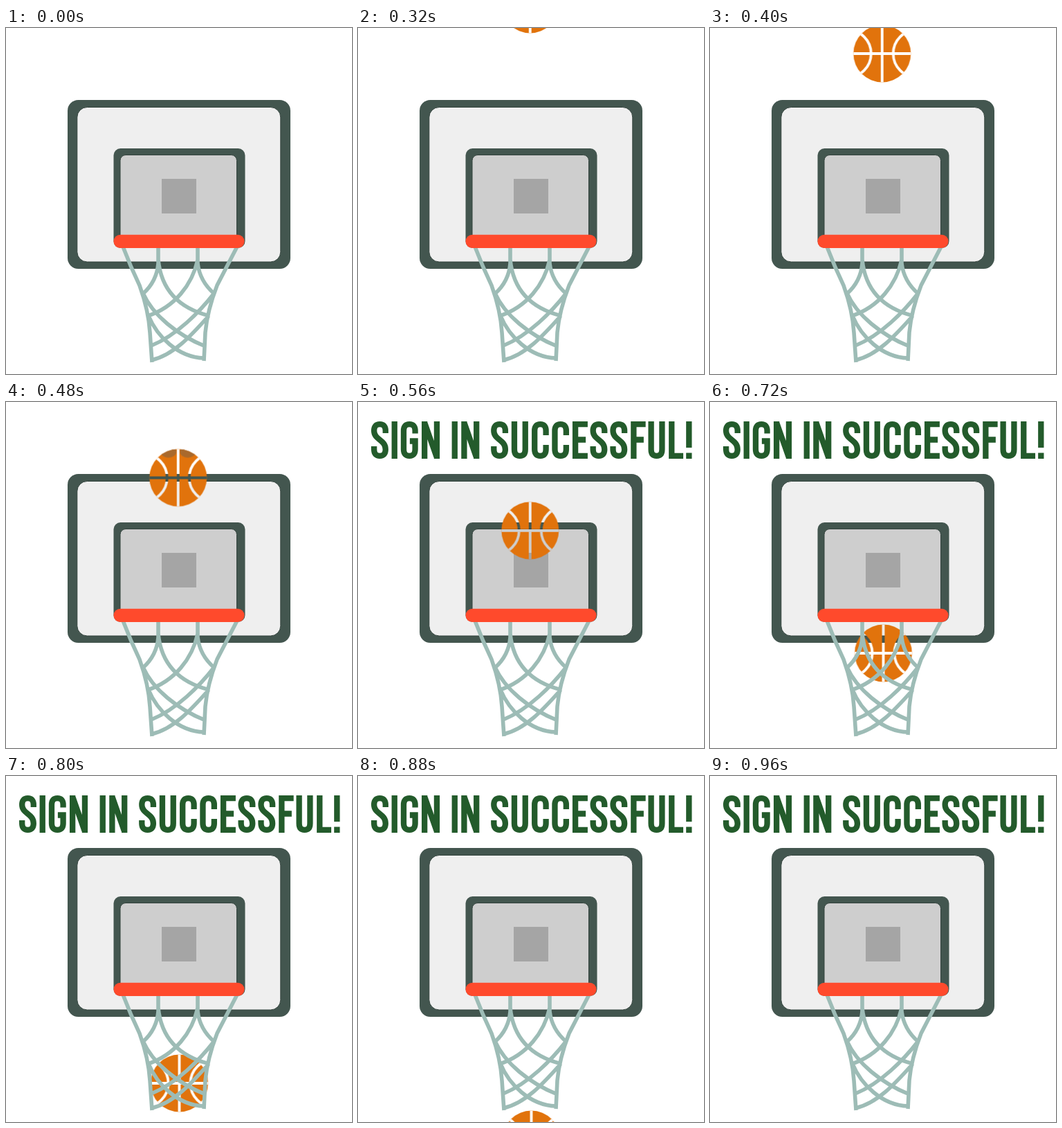
Write an HTML page with a canvas that moves like this. It is 500 px wide and 500 px high and loops after 1.04 s.

```html
<!DOCTYPE html>
<html lang="en">
<head>
<meta charset="utf-8">
<title>Sign in successful</title>
<style>
  html, body { margin: 0; width: 100%; height: 100%; overflow: hidden; background: #fff; }
  canvas { display: block; width: 100vw; height: 100vh; }
</style>
</head>
<body>
<canvas id="stage" width="500" height="500" role="img" aria-label="SIGN IN SUCCESSFUL!"></canvas>
<script>
const SIZE = 500, LOOP = 1040, STEP = 80;
const DROP_START = 320, TITLE_START = 560, DROP_END = 960;
const RADIUS = 41.5;
const ctx = document.getElementById('stage').getContext('2d');

// Ball centre height for each step of the fall
const fall = [-34, 37, 109.5, 185.8, 281.8, 363, 444, 525];

// Condensed capitals: advance width and centre line, 54 px tall
const glyphs = {
  S: [28.9, 'M22.6 17V13.5Q22.6 4.2 14.3 4.2T6 13.5C6 27 22.6 26 22.6 40.5Q22.6 49.8 14.3 49.8T6 40.5V36'],
  I: [13.4, 'M6.7 0V54'],
  G: [29.8, 'M23.2 17.5V13.5Q23.2 4.2 14.9 4.2T6.6 13.5V40.5Q6.6 49.8 14.9 49.8T23.2 40.5V28.5H15.5'],
  N: [31.8, 'M7 0V54M24.8 0V54M7.5 3L24.3 51'],
  U: [29.5, 'M6.8 0V40.5Q6.8 49.8 14.7 49.8T22.6 40.5V0'],
  C: [29.3, 'M23 20V13.5Q23 4.2 14.8 4.2T6.6 13.5V40.5Q6.6 49.8 14.8 49.8T23 40.5V34'],
  E: [26.6, 'M24.8 4.2H7V49.8H24.8M7 26.5H22'],
  F: [25.5, 'M24.3 4.2H7V54M7 26.5H21.5'],
  L: [25.1, 'M7 0V49.8H23.8'],
  '!': [14.4, 'M7 0V38M7 45.5V54'],
  ' ': [12.2, '']
};

const net = new Path2D([
  'M169 316Q180 345 193 372Q206 408 208 440L211 483',
  'M334 316Q319 345 305 372Q291 408 288 440L286 481',
  'M220 316V340Q218 366 198 384',
  'M277 316V340Q280 366 301 384',
  'M220 335C224 375 246 404 294 416',
  'M277 335C269 371 244 403 205 416',
  'M198 383C212 415 248 444 288 460',
  'M301 383C280 410 247 444 210 459',
  'M206 416C218 445 248 476 286 477',
  'M293 416C268 444 242 473 210 480'
].join(''));

function box(x, y, w, h, r, fill, line) {
  ctx.beginPath();
  ctx.roundRect(x, y, w, h, r);
  ctx.fillStyle = fill;
  ctx.fill();
  if (!line) return;
  ctx.strokeStyle = line;
  ctx.lineWidth = 1;
  ctx.stroke();
}

// The seams are cut out so the scene shows through them
function makeBall(shaded) {
  const c = document.createElement('canvas'), mid = 50;
  c.width = c.height = mid * 2;
  const b = c.getContext('2d');
  b.translate(mid, mid);
  b.beginPath();
  b.arc(0, 0, RADIUS, 0, Math.PI * 2);
  b.clip();
  b.fillStyle = '#e1730c';
  b.fillRect(-mid, -mid, mid * 2, mid * 2);
  if (shaded) {
    b.fillStyle = '#a9692c';
    for (const x of [-14, 14]) {
      b.beginPath();
      b.ellipse(x, -38, 11.5, 9, 0, 0, Math.PI * 2);
      b.fill();
    }
  }
  b.globalCompositeOperation = 'destination-out';
  b.lineWidth = 3.8;
  b.stroke(new Path2D(`M0 -${mid}V${mid}M-${mid} 0H${mid}`));
  for (const x of [-50.5, 50.5]) {
    b.beginPath();
    b.arc(x, 0, 34.5, 0, Math.PI * 2);
    b.stroke();
  }
  return c;
}

const ball = makeBall(false), shadedBall = makeBall(true);

function drawBoard() {
  box(89, 104, 322, 244, 15.5, '#43564f');
  box(102.8, 114.5, 294, 223.5, 14.5, '#efefef', '#31413b');
  box(155.5, 174, 190, 144, 10, '#43564f');
  box(165, 183.5, 168.5, 125, 8, '#cecece', '#31413b');
  box(225, 218, 50, 50, 0, '#a5a5a5');
}

function drawHoop() {
  ctx.strokeStyle = '#9dbcb6';
  ctx.lineWidth = 5.6;
  ctx.stroke(net);
  box(155.5, 298.7, 189, 19.3, 9.6, '#ff4a2c');
}

function drawTitle() {
  ctx.save();
  ctx.translate(17.2, 28);
  ctx.strokeStyle = '#235b2b';
  ctx.lineWidth = 8.3;
  for (const ch of 'SIGN IN SUCCESSFUL!') {
    const [advance, path] = glyphs[ch];
    ctx.stroke(new Path2D(path));
    ctx.translate(advance - 0.05, 0);
  }
  ctx.restore();
}

function draw(t) {
  ctx.fillStyle = '#fff';
  ctx.fillRect(0, 0, SIZE, SIZE);
  drawBoard();
  if (t >= DROP_START && t < DROP_END) {
    const i = Math.floor((t - DROP_START) / STEP);
    const x = i < 4 ? 248.7 : 250.5;
    ctx.drawImage(i === 2 ? shadedBall : ball, x - 50, fall[i] - 50);
  }
  drawHoop();
  if (t >= TITLE_START) drawTitle();
}

const start = performance.now();
function tick() {
  draw((performance.now() - start) % LOOP);
  requestAnimationFrame(tick);
}
tick();
</script>
</body>
</html>
```
